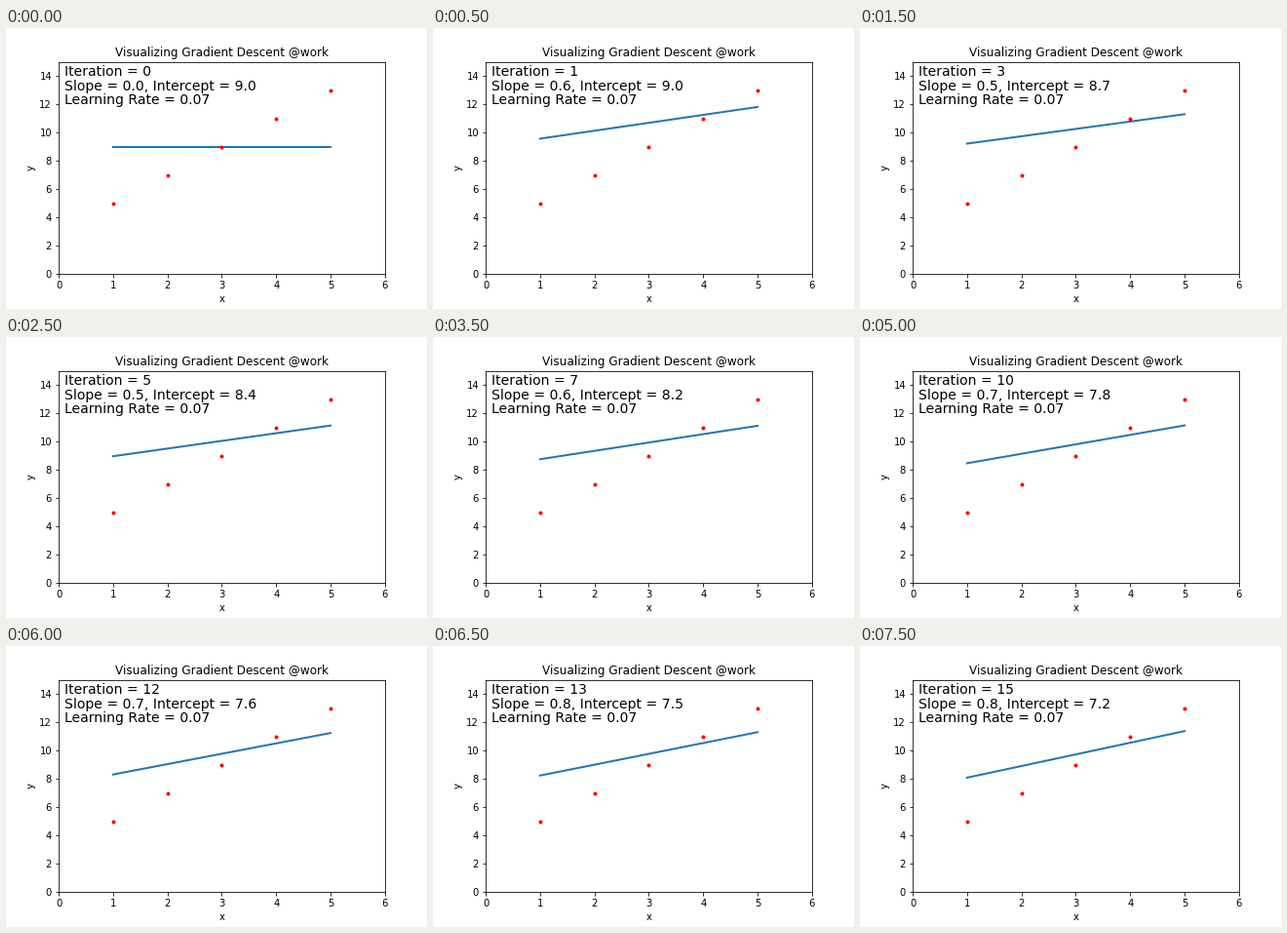
Write a matplotlib script that moves like this. It is 432x288 px and loops after 8 s.

```python
import numpy as np
import matplotlib.pyplot as plt
from matplotlib.animation import FuncAnimation

RATE = 0.07
STEPS = 16

x = np.arange(1, 6)
y = 2 * x + 3


def descend(steps, slope=0.0, intercept=9.0):
    """Return the (slope, intercept) pairs of a least-squares descent."""
    path = []
    for _ in range(steps):
        path.append((slope, intercept))
        error = y - (slope * x + intercept)
        slope += 2 * RATE * np.mean(x * error)
        intercept += 2 * RATE * np.mean(error)
    return path


path = descend(STEPS)

fig, ax = plt.subplots(figsize=(6, 4), dpi=72)
fig.subplots_adjust(left=0.125, right=0.9, bottom=0.125, top=0.88)
ax.set(xlim=(0, 6), ylim=(0, 15), xlabel="x", ylabel="y")
ax.set_title("Visualizing Gradient Descent @work")

line, = ax.plot([], [], lw=2)
ax.plot(x, y, "r.")
iteration = ax.text(0.1, 14, "", fontsize=14)
params = ax.text(0.1, 13, "", fontsize=14)
ax.text(0.1, 12, f"Learning Rate = {RATE}", fontsize=14)


def update(i):
    slope, intercept = path[i]
    line.set_data(x, slope * x + intercept)
    iteration.set_text(f"Iteration = {i}")
    params.set_text(f"Slope = {slope:.1f}, Intercept = {intercept:.1f}")
    return line, iteration, params


anim = FuncAnimation(fig, update, frames=STEPS, interval=500,
                     repeat=True, repeat_delay=0)
plt.show()
```
